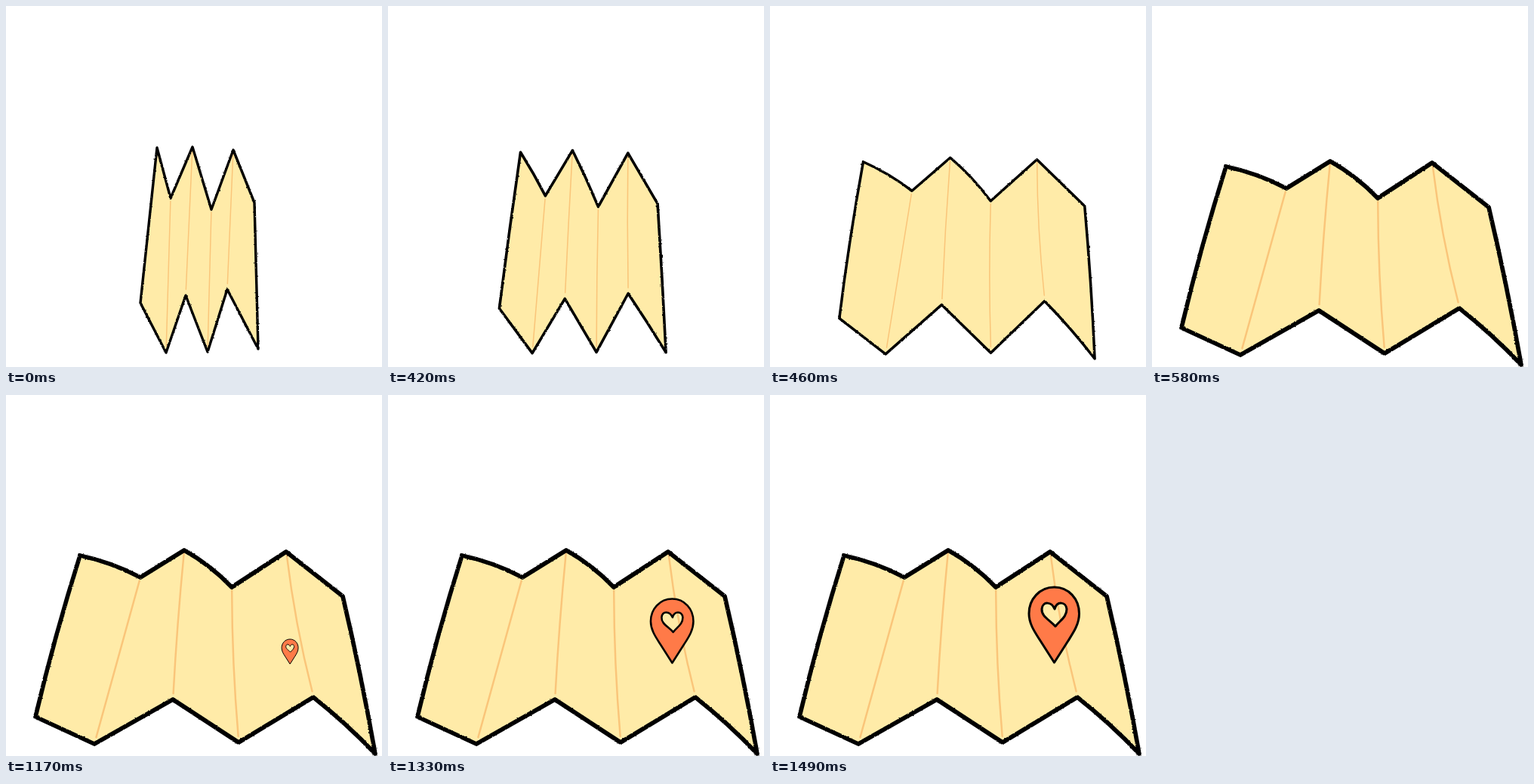
Write an HTML page that moves like this. It is 498 px wide and 479 px high and loops after 3240 ms.

```html
<!DOCTYPE html>
<html lang="en">
<head>
<meta charset="utf-8">
<title>Unfolding map</title>
<style>
  html, body { margin: 0; width: 100%; height: 100%; overflow: hidden; background: #fff; }
  svg { display: block; width: 100%; height: 100%; }
</style>
</head>
<body>
<svg viewBox="0 0 498 479">
  <defs>
    <filter id="rough" filterUnits="userSpaceOnUse" x="0" y="0" width="498" height="479" color-interpolation-filters="sRGB">
      <feTurbulence type="fractalNoise" baseFrequency=".4" numOctaves="1" seed="4"/>
      <feDisplacementMap in="SourceGraphic" scale="2.4" xChannelSelector="R" yChannelSelector="G"/>
    </filter>
  </defs>
  <path id="paper" fill="#ffeba8"/>
  <path id="folds" fill="none" stroke="#fac57a" stroke-linecap="round"/>
  <path id="ink" fill="none" stroke="#000" stroke-linejoin="round" filter="url(#rough)"/>
  <g id="pin" stroke="#000" stroke-linejoin="round">
    <path fill="#ff7a48" fill-rule="evenodd" stroke-width="3" d="M376.5 255C396 255 409.5 271 409.5 290C409.5 304 402 315 395 326L376.5 355L358 326C351 315 343 304 343 290C343 271 357 255 376.5 255Z
      M377 284C373 274 361 273 360 284C359.5 294 370 298 378 307C384 299 393 295 393 284C392 274 380 273 377 284Z"/>
  </g>
</svg>
<script>
const LOOP = 3240;
const el = id => document.getElementById(id);

// Corners run clockwise: six along the top, six back along the bottom.
const folded = [[200, 188], [218, 255], [247, 187], [272, 270], [301, 191], [329, 261],
  [334, 455], [293, 376], [267, 459], [238, 384], [212, 460], [178, 394]];
const spread = [[98, 213], [178, 242], [236, 206], [299, 255], [371, 208], [446, 267],
  [489, 476], [407, 401], [308, 461], [221, 404], [117, 463], [39, 427]];

// How far each edge bows sideways once the map is open; other edges stay straight.
const bows = { 0: -6, 2: -6, 5: -3, 6: 4, 11: -4 };

// The top edge opens slightly ahead of the bottom one.
const stages = [
  { at: 0, top: 0, bottom: 0, ink: 3.4 },
  { at: 420, top: .24, bottom: .22, ink: 3.6 },
  { at: 460, top: .75, bottom: .62, ink: 3.5 },
  { at: 580, top: 1, bottom: 1, ink: 5.7 }
];

const mix = (a, b, k) => a + (b - a) * k;
const between = (p, q, k) => [mix(p[0], q[0], k), mix(p[1], q[1], k)];

// Quadratic curve from p to q, pushed sideways by bow.
function curve(p, q, bow) {
  const [mx, my] = between(p, q, .5);
  const dx = q[0] - p[0], dy = q[1] - p[1], len = Math.hypot(dx, dy);
  return `Q${mx - dy / len * bow} ${my + dx / len * bow} ${q}`;
}

function drawMap({ top, bottom, ink }) {
  const corners = folded.map((p, i) => between(p, spread[i], i < 6 ? top : bottom));
  const outline = `M${corners[0]}` + corners.map((p, i) =>
    curve(p, corners[(i + 1) % 12], (bows[i] || 0) * top)).join('') + 'Z';

  let folds = '';
  for (let i = 1; i < 5; i++) {
    const a = between(corners[i], corners[11 - i], .02);
    const b = between(corners[i], corners[11 - i], .96);
    folds += `M${a}` + curve(a, b, 2 * (i - 1) * top);
  }

  el('paper').setAttribute('d', outline);
  el('ink').setAttribute('d', outline);
  el('ink').setAttribute('stroke-width', ink);
  el('folds').setAttribute('d', folds);
  el('folds').setAttribute('stroke-width', ink * .43);
}

// The pin grows in even steps past full size, then settles.
function drawPin(t) {
  const step = Math.floor((t - 1170) / 80);
  const scale = step < 4 ? .33 + .26 * step : 1;
  el('pin').setAttribute('visibility', step < 0 ? 'hidden' : 'visible');
  el('pin').setAttribute('transform', `translate(376 358) scale(${scale}) translate(-376 -358)`);
}

let shown;
function draw(t) {
  const stage = stages.filter(s => s.at <= t).pop();
  if (stage !== shown) drawMap(shown = stage);
  drawPin(t);
}

const start = performance.now();
function tick() {
  draw((performance.now() - start) % LOOP);
  requestAnimationFrame(tick);
}
tick();
</script>
</body>
</html>
```
